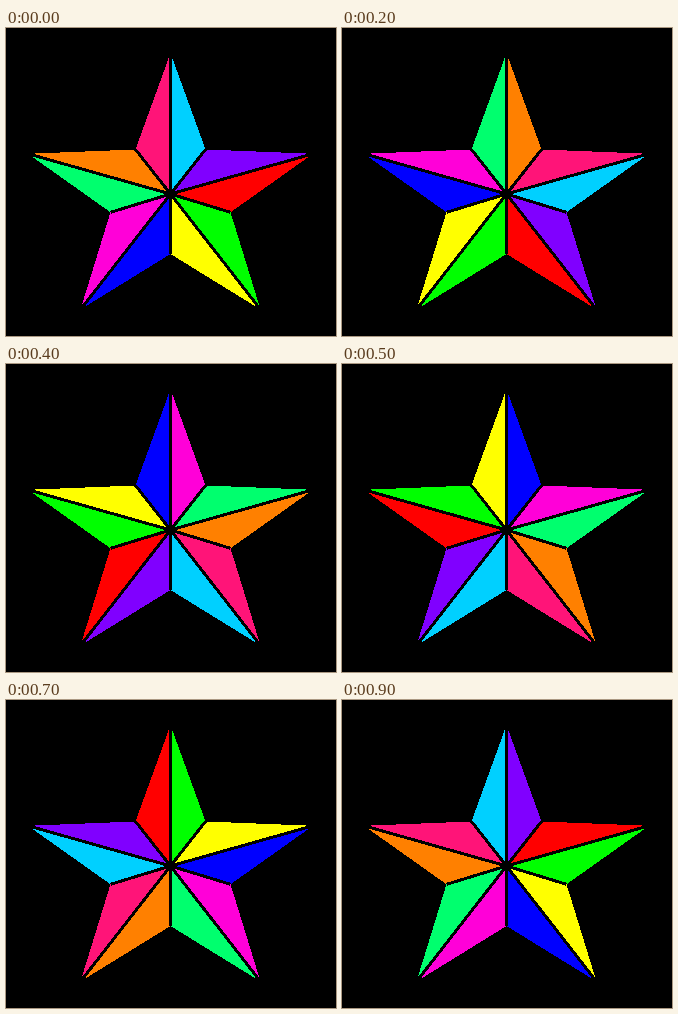
These frames come from a looping animation (330x308 px, 1 s). An HTML page:

```html
<!DOCTYPE html>
<html lang="en">
<head>
<meta charset="utf-8">
<title>Colour star</title>
<style>
  html, body { margin: 0; width: 100%; height: 100%; overflow: hidden; background: #000; }
  svg { display: block; width: 330px; height: 308px; shape-rendering: crispEdges; }
  .facet {
    animation: hues 1s step-end infinite;
    /* the half millisecond keeps rounding off the step edges */
    animation-delay: calc((var(--i) - 10) * 100ms - .5ms);
  }
  .spoke { stroke: #000; stroke-width: 3; }
  @keyframes hues {
    0%, 100% { fill: #00d0ff; }
    10% { fill: #ff1478; }
    20% { fill: #ff8000; }
    30% { fill: #00ff6e; }
    40% { fill: #ff00d8; }
    50% { fill: #0000ff; }
    60% { fill: #ffff00; }
    70% { fill: #00ff00; }
    80% { fill: #ff0000; }
    90% { fill: #8000ff; }
  }
</style>
</head>
<body>
<svg id="star" viewBox="0 0 330 308"></svg>
<script>
  const star = document.getElementById('star');
  const cx = 164.5, cy = 166;

  // right half of the rim, clockwise from the top tip; the left half mirrors it
  const half = [[0, 25], [35, 121.5], [142.5, 125.8], [60, 184.3], [90, 281.5], [0, 226]];
  const mirror = half.slice(1, 5).reverse().map(([x, y]) => [-x, y]);
  const rim = [...half, ...mirror].map(([x, y]) => [cx + x, y]);

  function add(tag, attrs) {
    const el = document.createElementNS('http://www.w3.org/2000/svg', tag);
    for (const key in attrs) el.setAttribute(key, attrs[key]);
    star.append(el);
  }

  rim.forEach((p, i) => {
    const next = rim[(i + 1) % rim.length];
    add('polygon', { class: 'facet', style: `--i:${i}`, points: `${cx},${cy} ${p} ${next}` });
  });
  rim.forEach(([x, y]) => add('line', { class: 'spoke', x1: cx, y1: cy, x2: x, y2: y }));
</script>
</body>
</html>
```
